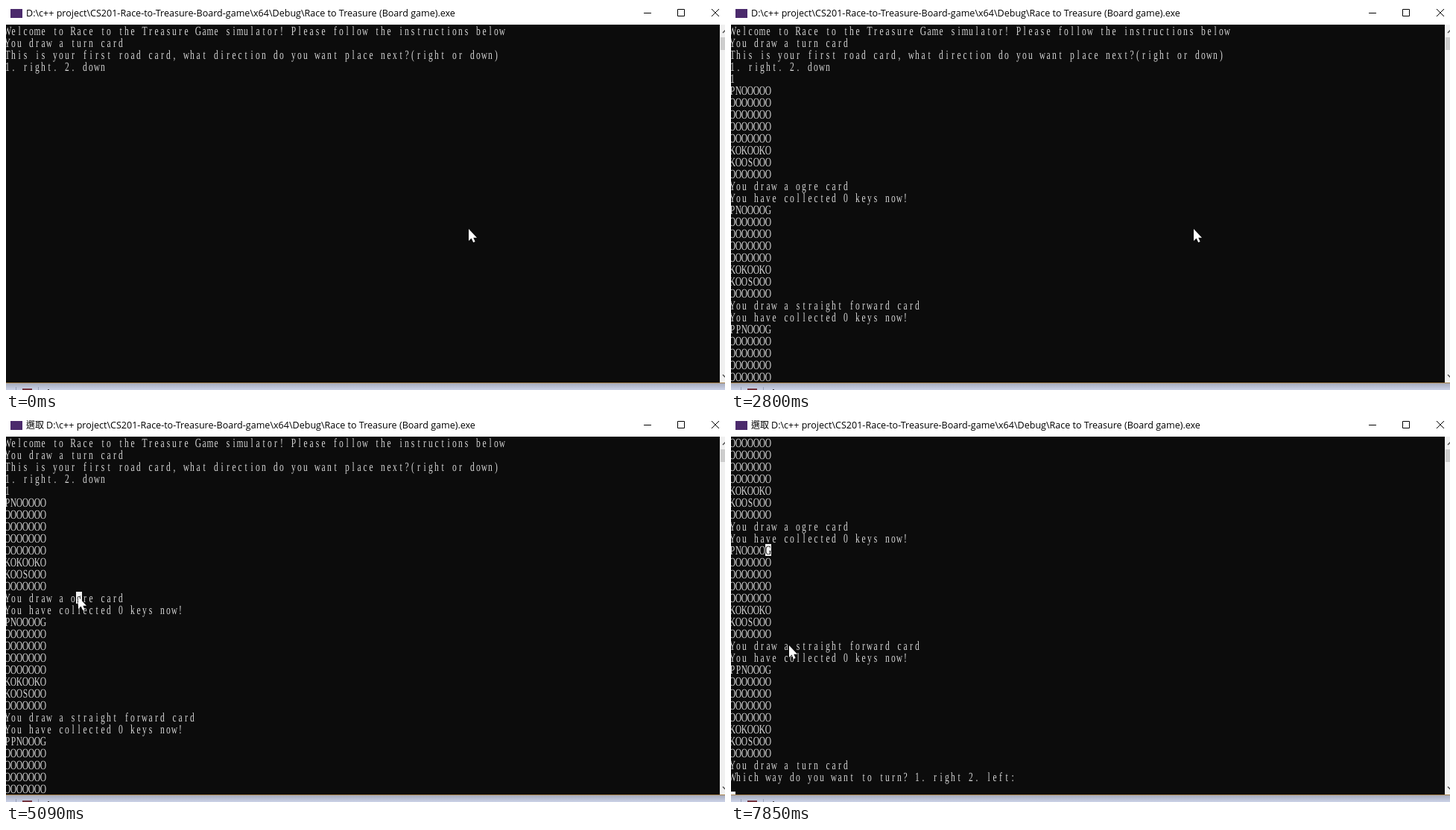
An HTML page that plays this animation: 965 px wide and 515 px high, repeating every 8000 ms.

```html
<!DOCTYPE html>
<html lang="en">
<head>
<meta charset="utf-8">
<title>Console game</title>
<style>
  html, body { margin: 0; width: 100%; height: 100%; overflow: hidden; background: #0c0c0c; }
  svg { display: block; width: 965px; height: 515px; }
  .path { font: 12.56px "Open Sans", sans-serif; }
  .prefix { font: 12px "Noto Sans CJK TC", "Noto Sans CJK", sans-serif; }
  .con text { font: 17px "Liberation Serif", serif; fill: #d6d6d6; text-anchor: middle; text-rendering: geometricPrecision; }
  .con #glyph { fill: #0c0c0c; }
</style>
</head>
<body>
<svg viewBox="0 0 965 515">
  <defs>
    <clipPath id="view"><rect y="25" width="958" height="480"/></clipPath>
    <linearGradient id="shade" x2="0" y2="1"><stop stop-color="#a2a7b8"/><stop offset="1" stop-color="#ccd3e8"/></linearGradient>
  </defs>
  <rect width="965" height="515" fill="#0c0c0c"/>

  <g class="con" clip-path="url(#view)">
    <g id="scroll">
      <g id="lines"></g>
      <rect id="caret" width="8" height="4" fill="#f2f2f2"/>
      <g id="mark"><rect width="8" height="16" fill="#f2f2f2"/></g>
    </g>
  </g>

  <rect width="965" height="25" fill="#fff"/>
  <rect x="6" y="4" width="16" height="12" fill="#4b2a6c"/>
  <text id="prefix" class="prefix" x="27" y="14">選取</text>
  <text id="path" class="path" y="14">D:\c++ project\CS201-Race-to-Treasure-Board-game\x64\Debug\Race to Treasure (Board game).exe</text>
  <path d="M856 9.5h10M901.5 4.5h9v9h-9zM947 4l10 10M957 4l-10 10" fill="none" stroke="#000"/>

  <rect x="958" y="25" width="7" height="480" fill="#f0f0f0"/>
  <rect x="959" y="42" width="6" height="17" fill="#cdcdcd"/>
  <path d="M962 36l3.5-3.5M962 494.5l3.5 3.5" fill="none" stroke="#505050" stroke-width="1.5"/>

  <rect y="505" width="965" height="10" fill="url(#shade)"/>
  <rect y="505" width="965" height="1" fill="#a8834c"/>
  <path d="M13.5 511v4M43.5 511v4" stroke="#98a0b8"/>
  <rect x="22" y="513" width="13" height="2" fill="#74343f"/>
  <rect x="56" y="514" width="2" height="1" fill="#444"/>

  <path id="mouse" d="M0 0V16L3.6 12.6L6.200 18L8.600 17L6.300 11.700H11Z" fill="#fff"/>
</svg>
<script>
const $ = id => document.getElementById(id);
const LOOP = 8000, TOP = 25, ROW = 16, COL = 8, LEFT = -2, NARROW = 0.68;

const board = first => [first, ...Array(4).fill("OOOOOOO"), "KOKOOKO", "KOOSOOO", "OOOOOOO"];
const keys = "You have collected 0 keys now!";
const lines = [
  "Welcome to Race to the Treasure Game simulator! Please follow the instructions below",
  "You draw a turn card",
  "This is your first road card, what direction do you want place next?(right or down)",
  "1. right. 2. down",
  "1",
  ...board("PNOOOOO"),
  "You draw a ogre card", keys,
  ...board("PNOOOOG"),
  "You draw a straight forward card", keys,
  ...board("PPNOOOG"),
  "You draw a turn card",
  "Which way do you want to turn? 1. right 2. left:"
];

// The mouse passes these points: time, x, y
const stops = [
  [0, 621, 299], [3070, 621, 299], [3330, 400, 343], [3710, 39, 120], [4130, 10, 110],
  [4430, 304, 165], [5090, 97, 240], [5240, 97, 240], [5630, 114, 295], [5910, 98, 315],
  [6420, 50, 274], [6720, 50, 274], [7000, 198, 328], [7850, 78, 305], [LOOP, 78, 305]
];

// The screen is refreshed about every 133 ms, so each leg moves in that many hops
function mouseAt(t) {
  const i = stops.findLastIndex(stop => stop[0] <= t);
  const [t0, x0, y0] = stops[i], [t1, x1, y1] = stops[i + 1];
  const hops = Math.max(1, Math.round((t1 - t0) / 133));
  const u = Math.floor((t - t0) / (t1 - t0) * hops) / hops;
  const k = Math.sin(u * Math.PI / 2);
  return [x0 + (x1 - x0) * k, y0 + (y1 - y0) * k];
}

const between = (t, a, b) => t >= a && t < b;
const lineCount = t => t < 1450 ? 4 : t < 2010 ? 5 : lines.length;
const clicked = t => t < 4130 ? null : t < 5090 ? [5, 1] : t < 6570 ? [13, 12] : [15, 6];

// Three lines per wheel notch
function scrolled(t) {
  const notches = between(t, 2010, 2680) || t >= 7560 ? 2
    : between(t, 2680, 2800) || t >= 7410 ? 1 : 0;
  return 3 * notches;
}

const move = (el, x, y) => el.setAttribute("transform", `translate(${x} ${y})`);
const show = (el, on) => el.setAttribute("visibility", on ? "visible" : "hidden");

// Condensed serif text, each character centred in its console cell
function cells(parent, str, x, y) {
  const el = document.createElementNS("http://www.w3.org/2000/svg", "text");
  el.textContent = str;
  el.setAttribute("x", [...str].map((_, i) => (i + 0.5) * COL / NARROW).join(" "));
  el.setAttribute("transform", `translate(${x} ${y + 14}) scale(${NARROW} 1)`);
  return parent.appendChild(el);
}

const rows = lines.map((line, i) => cells($("lines"), line, LEFT, TOP + i * ROW));
const glyph = cells($("mark"), "N", 0, 0);
glyph.id = "glyph";

function draw(t) {
  const count = lineCount(t), cell = clicked(t);
  rows.forEach((el, i) => show(el, i < count));
  move($("scroll"), 0, -ROW * scrolled(t));
  show($("caret"), between(t, 430, 1020) || between(t, 2160, 2560) || t >= 2800);
  move($("caret"), LEFT, TOP + count * ROW + 12);
  show($("mark"), cell);
  show($("prefix"), cell);
  $("path").setAttribute("x", cell ? 54 : 27);
  if (cell) {
    const [row, col] = cell;
    move($("mark"), LEFT + col * COL, TOP + row * ROW);
    glyph.textContent = lines[row][col];
  }
  move($("mouse"), ...mouseAt(t));
}

const start = performance.now();
function tick() {
  draw((performance.now() - start) % LOOP);
  requestAnimationFrame(tick);
}
tick();
</script>
</body>
</html>
```
